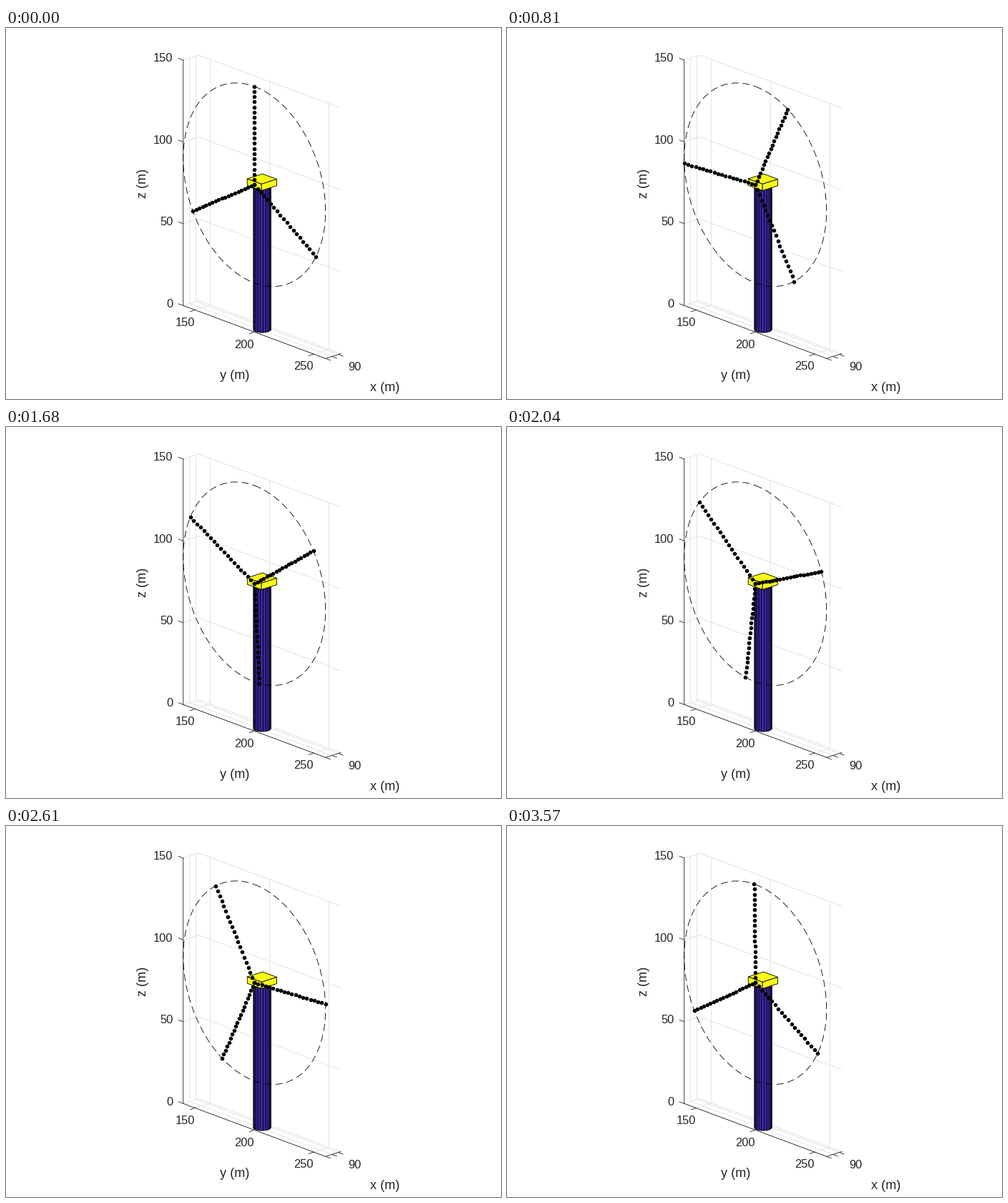
A matplotlib script for the animation above (3.6 s loop, 692 by 519 pixels).

```python
import numpy as np
import matplotlib.pyplot as plt
from matplotlib.animation import FuncAnimation

W, H, DPI = 692, 519, 64
PT = 72 / DPI                      # points per pixel
FRAMES, INTERVAL = 120, 30
HUB_X, HUB_Y, HUB_Z, ROTOR = 80, 200, 90, 60
X0, X1, Y0, Y1, Z1 = 80, 92, 140, 260, 150
INK, GRID = "#262626", "#dfdfdf"
THIN = 0.85


def project(x, y, z):
    """Orthographic view of the scene (metres) in stage pixels."""
    x, y, z = np.broadcast_arrays(x, y, z)
    dx, dy = x - X0, y - HUB_Y
    return (347.2 + 1.786 * dx + 1.658 * dy,
            425.3 - 0.572 * dx + 0.617 * dy - 2.29 * z)


fig = plt.figure(figsize=(W / DPI, H / DPI), dpi=DPI, facecolor="white")
ax = fig.add_axes([0, 0, 1, 1])
ax.set_xlim(0, W)
ax.set_ylim(H, 0)
ax.axis("off")


def line(x, y, z, color=INK, zorder=2):
    ax.plot(*project(x, y, z), color=color, lw=THIN * PT, zorder=zorder)


def face(x, y, z, color, zorder):
    ax.fill(*project(x, y, z), fc=color, ec="black", lw=THIN * PT,
            joinstyle="round", zorder=zorder)


def label(x, y, text, size=16.5, **style):
    ax.text(x, y, text, fontsize=size * PT, color=INK,
            family="Liberation Sans", **style)


def draw_axes():
    x_ticks, y_ticks, z_ticks = (80, 85, 90), (150, 200, 250), (0, 50, 100, 150)
    tick = 4
    for x in x_ticks:
        line([x, x, x], [Y1, Y0, Y0], [0, 0, Z1], GRID, 1)
        line([x, x], [Y1, Y1 + tick], 0)
    for y in y_ticks:
        line([X0, X1, X1], [y, y, y], [0, 0, Z1], GRID, 1)
        line([X0, X0 - tick], [y, y], 0)
        px, py = project(X0, y, 0)
        label(px - 14, py + 22.3, str(y), ha="center")
    for z in z_ticks:
        line([X0, X1, X1], [Y0, Y0, Y1], z, GRID, 1)
        line([X0, X0], [Y0, Y0 - tick], z)
        py = project(X0, Y0, z)[1]
        label(233.5, py + 2.4, str(z), ha="right")
    label(487.7, 478.6, "90", ha="center")

    line([X0, X0, X0, X1], [Y0, Y0, Y1, Y1], [Z1, 0, 0, 0])
    centered = dict(size=18.1, ha="center", va="center")
    label(319.5, 486.5, "y (m)", **centered)
    label(529.5, 503.5, "x (m)", **centered)
    label(192, 217.5, "z (m)", rotation=90, **centered)


def draw_tower():
    cx, radius, top = 86, 5, 88
    t = np.radians(np.arange(0, 361, 18))
    xs, ys = cx + radius * np.cos(t), HUB_Y + radius * np.sin(t)
    for i in range(20):
        xa, xb, ya, yb = xs[i], xs[i + 1], ys[i], ys[i + 1]
        (pa, pb), _ = project([xa, xb], [ya, yb], 0)
        if pa > pb:                # facing the viewer
            face([xa, xb, xb, xa], [ya, yb, yb, ya], [0, 0, top, top],
                 "#3e26a8", 3)


def draw_nacelle():
    ya, yb, za, zb = 194, 206, 88, 92
    yellow = "#f9fb15"
    face([X0, X1, X1, X0], [ya, ya, yb, yb], zb, yellow, 4)
    face(X0, [ya, yb, yb, ya], [za, za, zb, zb], yellow, 4)
    face([X0, X1, X1, X0], yb, [za, za, zb, zb], yellow, 4)


def rotor_point(radius, angle):
    return project(HUB_X, HUB_Y + radius * np.sin(angle),
                   HUB_Z + radius * np.cos(angle))


draw_axes()
draw_tower()
draw_nacelle()
ax.plot(*rotor_point(ROTOR, np.linspace(0, 2 * np.pi, 361)), color="black",
        lw=THIN * PT, ls=(0, (10 / THIN, 5.5 / THIN)),
        dash_capstyle="butt", zorder=5)
dots, = ax.plot([], [], "o", color="black", ms=5.6 * PT, mew=0, zorder=6,
                snap=False)

radii = np.tile(np.linspace(0, ROTOR, 20), 3)
offsets = np.repeat([0, 120, 240], 20)


def update(frame):
    dots.set_data(*rotor_point(radii, np.radians(offsets + frame)))
    return dots,


anim = FuncAnimation(fig, update, frames=FRAMES, interval=INTERVAL,
                     repeat=True, repeat_delay=0, blit=False)
plt.show()
```
